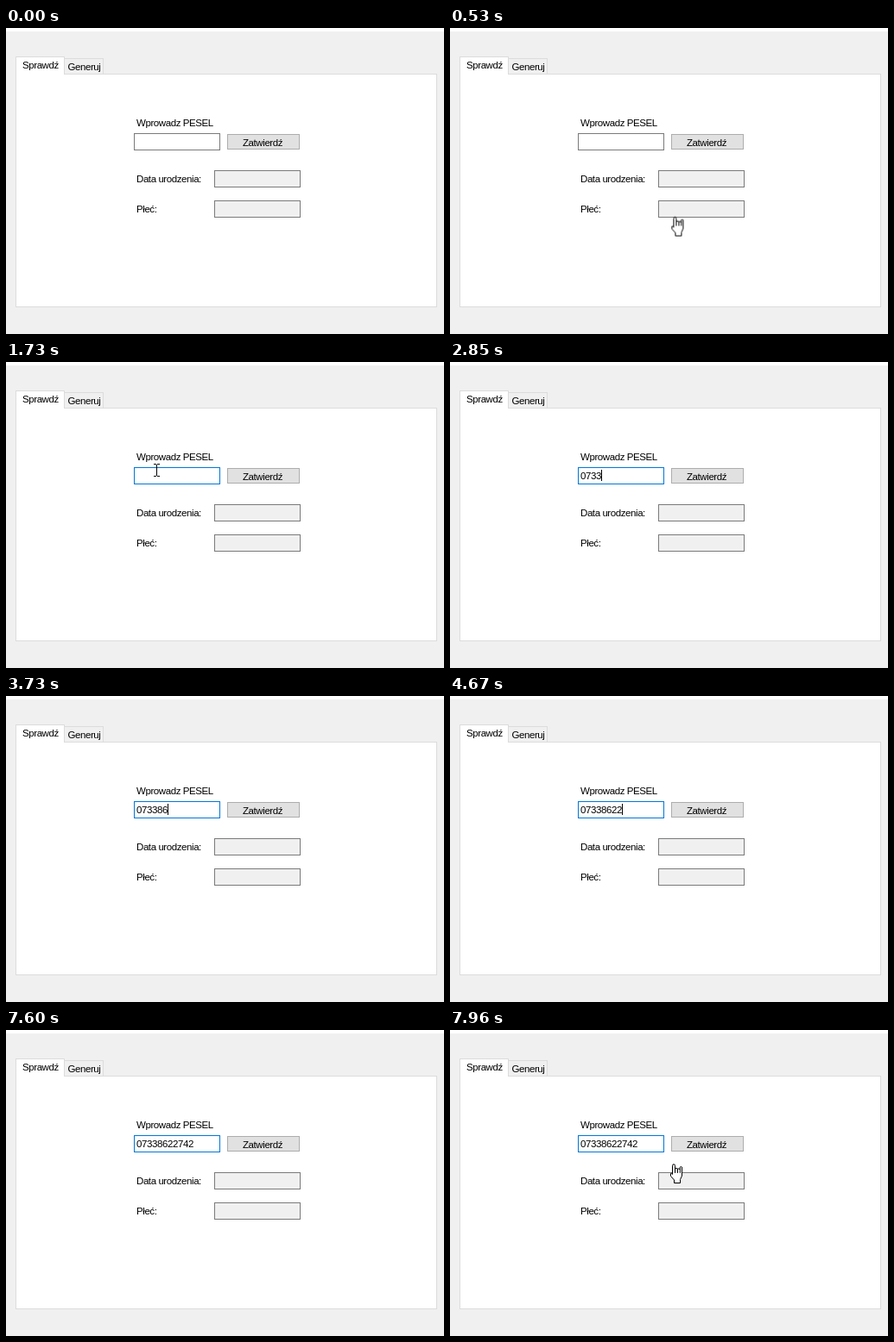
Recreate the animation shown at these times as an HTML page. Size 507 by 355 pixels, loop 8000 ms.

```html
<!DOCTYPE html>
<html lang="pl">
<head>
<meta charset="utf-8">
<title>PESEL</title>
<style>
  html, body { margin: 0; width: 100%; height: 100%; overflow: hidden; background: #f0f0f0; }
  svg { position: absolute; left: 0; top: 0; display: block; }
  text, .digits { font: 11.5px "Liberation Sans", Arial, sans-serif; letter-spacing: -.42px; fill: #000; color: #000; }
  rect { shape-rendering: crispEdges; }
  .line { stroke: #dcdcdc; }
  .field { fill: #fff; stroke: #7a7a7a; }
  .locked { fill: #f0f0f0; stroke: #7a7a7a; }
  .button { fill: #e1e1e1; stroke: #adadad; }

  .digits { position: absolute; left: 151px; top: 124px; width: 0; height: 16px; line-height: 16px;
            letter-spacing: -.4px; white-space: nowrap; overflow: hidden; }
  .caret { position: absolute; left: 151px; top: 125px; width: 1px; height: 13px; background: #000; }

  /* One 8 s loop; percentages are ms / 80. */
  .digits, .caret, .focus, .hand, .beam, .glow { animation: 8s step-end -5ms infinite; }
  .digits { animation-name: type; }
  .caret { animation-name: advance, blink; }
  .focus { animation-name: focus; }
  .hand { animation-name: hand; }
  .beam { animation-name: beam; }
  .glow { animation-name: glow; mix-blend-mode: multiply; }

  @keyframes type {
    0% { width: 0; }
    25.125% { width: 6px; }
    27.5% { width: 12px; }
    33.25% { width: 18px; }
    35.625% { width: 24px; }
    45.125% { width: 30px; }
    46.625% { width: 36px; }
    56.125% { width: 42px; }
    58.375% { width: 48px; }
    63.5% { width: 54px; }
    86.875% { width: 60px; }
    88.375%, 100% { width: 67px; }
  }
  @keyframes advance {
    0% { transform: none; }
    25.125% { transform: translateX(6px); }
    27.5% { transform: translateX(12px); }
    33.25% { transform: translateX(18px); }
    35.625% { transform: translateX(24px); }
    45.125% { transform: translateX(30px); }
    46.625% { transform: translateX(36px); }
    56.125% { transform: translateX(42px); }
    58.375% { transform: translateX(48px); }
    63.5% { transform: translateX(54px); }
    86.875% { transform: translateX(60px); }
    88.375%, 100% { transform: translateX(66px); }
  }
  @keyframes blink {
    0%, 21.625%, 42.25%, 53.25%, 70.125%, 83.125%, 95%, 100% { opacity: 0; }
    12.625%, 25.125%, 45.125%, 56.125%, 76.75%, 86.875% { opacity: 1; }
  }
  @keyframes focus {
    0% { stroke: #7a7a7a; }
    12%, 100% { stroke: #0078d7; }
  }
  @keyframes hand {
    0% { opacity: 0; transform: translate(381px, 309px); }
    3.625% { opacity: 1; transform: translate(381px, 309px); animation-timing-function: steps(5, end); }
    7% { opacity: 1; transform: translate(224px, 196px); animation-timing-function: steps(2, end); }
    8.5% { opacity: 1; transform: translate(187px, 152px); animation-timing-function: steps(2, end); }
    9.625% { opacity: 1; transform: translate(167px, 119px); }
    14.125% { opacity: 0; transform: translate(167px, 119px); }
    97% { opacity: 1; transform: translate(200px, 135px); }
    98.25% { opacity: 1; transform: translate(238px, 150px); }
    99.5%, 100% { opacity: 1; transform: translate(254px, 155px); }
  }
  @keyframes beam {
    0% { opacity: 0; transform: translate(170px, 117px); }
    14.125% { opacity: 1; transform: translate(170px, 117px); }
    25.125% { opacity: 0; transform: translate(170px, 121px); }
    95.875% { opacity: 1; transform: translate(170px, 121px); }
    97%, 100% { opacity: 0; transform: translate(170px, 121px); }
  }
  @keyframes glow {
    0%, 12.625%, 100% { opacity: 0; }
    10.375% { opacity: 1; }
  }
</style>
</head>
<body>
<svg width="507" height="355">
  <rect width="507" height="355" fill="#f0f0f0"/>
  <rect width="507" height="4" fill="#fff"/>

  <rect class="line" x="11.5" y="53.5" width="487" height="270" fill="#fff"/>
  <rect class="line" x="67.5" y="35.5" width="45" height="18" fill="#f0f0f0"/>
  <rect class="line" x="11.5" y="33.5" width="56" height="20" fill="#fff"/>
  <rect x="12" y="53" width="55" height="2" fill="#fff"/>
  <text x="19" y="47">Sprawdź</text>
  <text x="71.5" y="49">Generuj</text>

  <text x="151" y="114">Wprowadz PESEL</text>
  <rect class="field focus" x="148.5" y="122.5" width="99" height="19"/>
  <rect class="button" x="256.5" y="123.5" width="83" height="17"/>
  <text x="274" y="137">Zatwierdź</text>

  <text x="151" y="179">Data urodzenia:</text>
  <rect class="locked" x="241.5" y="165.5" width="99" height="19"/>
  <text x="151" y="214">Płeć:</text>
  <rect class="locked" x="241.5" y="200.5" width="99" height="19"/>
</svg>

<div class="digits">07338622742</div>
<div class="caret"></div>

<svg width="507" height="355">
  <g class="beam" fill="none" stroke="#000">
    <path d="M1 1.5H4M5 1.5H8M4.5 2V15M1 15.5H4M5 15.5H8"/>
  </g>
  <g class="hand" stroke="#000" stroke-linejoin="round" stroke-linecap="round">
    <path fill="#fff" d="M3.5 12V2.5Q3.5 .8 5 .8T6.5 2.5V6Q8 4.7 9.5 6.2Q11 5.2 12.3 6.7V4Q13.4 2.8 14.5 4V14L12.5 18.5V22.5H5.5V19L1.5 14.5V11.5Q2.5 10.8 3.5 12Z"/>
    <path fill="none" d="M6.5 6V10.5M9.5 6.2V10.5M12.3 6.7V10.5"/>
  </g>
</svg>
<svg class="glow" width="507" height="355">
  <circle cx="170" cy="120" r="12" fill="#fff55a"/>
</svg>
</body>
</html>
```
